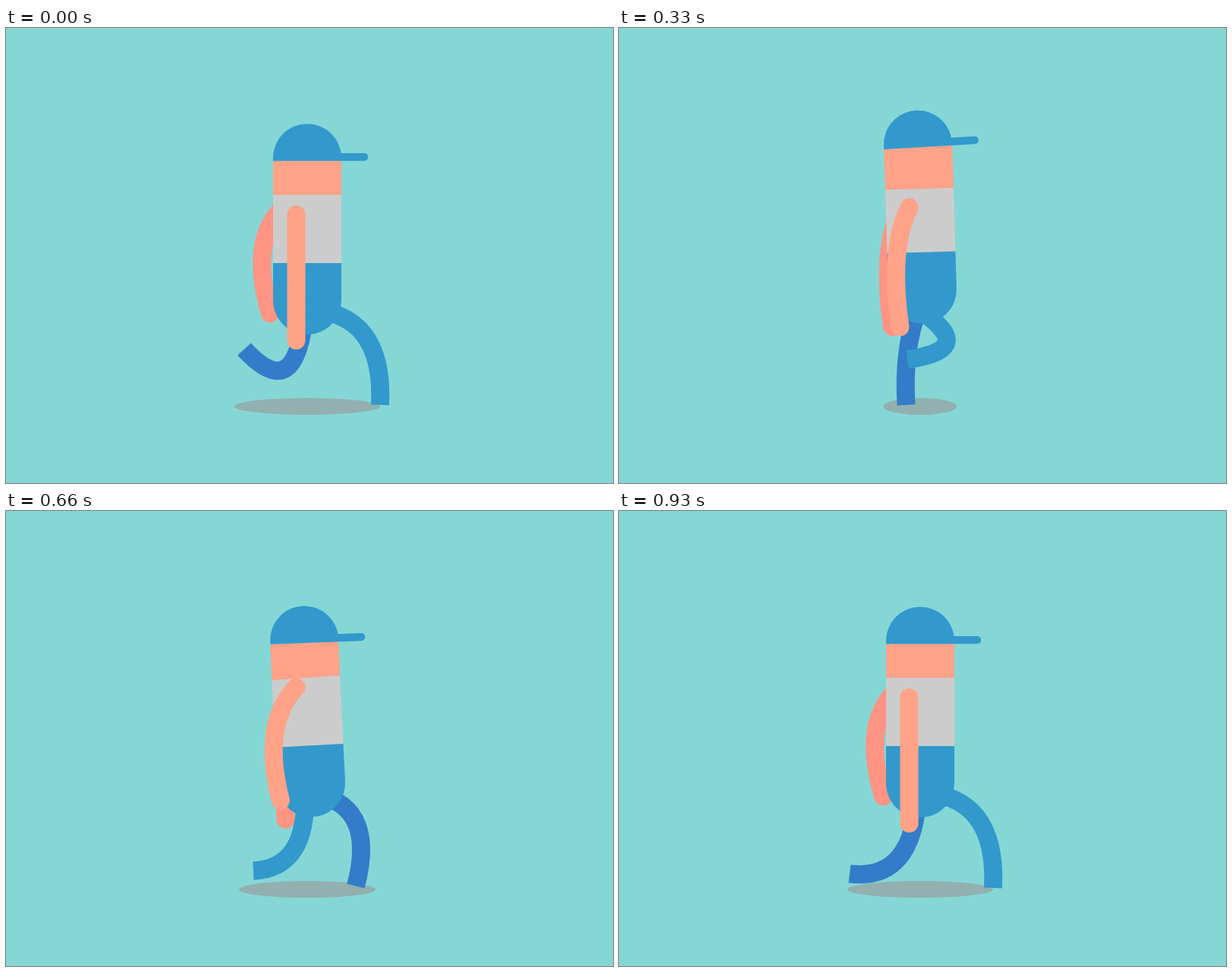
Recreate the animation shown at these times as an HTML page with a canvas. Size 800x600 px, loop 960 ms.

```html
<!DOCTYPE html>
<html lang="en">
<head>
<meta charset="utf-8">
<title>Walk cycle</title>
<style>
  html, body { margin: 0; width: 100%; height: 100%; overflow: hidden; background: #85d7d6; }
  canvas { display: block; }
</style>
</head>
<body>
<canvas id="stage" width="800" height="600"></canvas>
<script>
const ctx = document.getElementById('stage').getContext('2d');
const STEP = 30, CYCLE = 16;
const BG = '#85d7d6', SHADOW = '#91b0af', BLUE = '#3398cc', NAVY = '#327cc9',
      SKIN = '#ffa287', SKIN_BACK = '#ff9484', SHIRT = '#cccccc';

// Gait of one leg: step, knee handle, foot. The far leg runs half a cycle later.
const HIP = [394, 371];
const PLANT = [499, 373, 493, 497];
const GAIT = [
  [0, ...PLANT],
  [1, 417, 440, 409, 496.5],
  [3, 374, 425, 378.5, 497],
  [6, 398, 471, 326, 474.5],
  [7, 389, 489, 304, 478.3],
  [8, 384, 500, 314, 423.5],
  [9, 404, 471, 326.5, 435.5],
  [11, 476, 424, 380, 437],
  [14, 491, 381, 461, 494.5],
  [15, ...PLANT]
];

// Rises from 0 at a to 1 at peak, then falls to 0 at b
function tent(s, a, peak, b, fall = 1) {
  if (s <= a || s >= b) return 0;
  return s < peak ? (s - a) / (peak - a) : ((b - s) / (b - peak)) ** fall;
}

function leg(step) {
  const i = GAIT.findLastIndex(k => k[0] <= step);
  const a = GAIT[i], b = GAIT[i + 1] || a;
  const p = (step - a[0]) / (b[0] - a[0] || 1);
  return [...HIP, ...a.slice(1).map((v, n) => v + (b[n + 1] - v) * p)];
}

// Shoulder, bend and hand; swing runs from hanging (0) to fully back (1)
const arm = (x, swing, lift) => [
  x, 246 - 15.5 * swing - 2 * lift,
  x - 54 * swing, 329 - 55 * swing - 10 * lift,
  x - 24 * swing, 412 - 35.5 * swing
];

function limb(color, cap, [x, y, ...curve]) {
  ctx.beginPath();
  ctx.moveTo(x, y);
  ctx.quadraticCurveTo(...curve);
  ctx.lineWidth = 24;
  ctx.lineCap = cap;
  ctx.strokeStyle = color;
  ctx.stroke();
}

const rad = deg => deg * Math.PI / 180;

function edge([x, y, deg], shift = 0) {
  const c = Math.cos(rad(deg)), s = Math.sin(rad(deg));
  const mx = x - s * shift, my = y + c * shift;
  return [[mx - 45 * c, my - 45 * s], [mx + 45 * c, my + 45 * s]];
}

// The lower edge reaches one pixel under the next part to hide the seam
function band(color, top, bottom) {
  const [a, b] = edge(top), [c, d] = edge(bottom, 1);
  ctx.fillStyle = color;
  ctx.beginPath();
  [a, b, d, c].forEach(p => ctx.lineTo(...p));
  ctx.fill();
}

function part([x, y, deg], outline) {
  ctx.save();
  ctx.translate(x, y);
  ctx.rotate(rad(deg));
  ctx.fillStyle = BLUE;
  ctx.beginPath();
  outline();
  ctx.fill();
  ctx.restore();
}

function pantsOutline() {
  ctx.moveTo(-45, 0);
  ctx.lineTo(45, 0);
  ctx.arc(0, 49, 45, 0, Math.PI);
}

function capOutline() {
  ctx.moveTo(-45, 0);
  ctx.arc(0, -3.8, 45, Math.PI, 0);
  ctx.lineTo(45, 0);
  ctx.closePath();
  ctx.roundRect(30, -10.2, 50.2, 10.2, [0, 5, 5, 0]);
}

function draw(s) {
  const lift = tent(s, 0, 3, 7, 1.5) + tent(s, 7, 11, 15, 1.5);
  const swing = tent(s, 0, 7, 15);
  const lean = tent(s, 3, 7, 14);
  const nod = tent(s, 0, 3, 7);
  const look = tent(s, 3, 8.5, 14.5);
  const sag = 1.5 * lean;

  // Centre and angle of the lines where the parts meet
  const cap = [397 - 3.7 * nod - 5 * look, 175.2 - 18.4 * lift + sag, 4 * nod - 5.8 * look];
  const neck = [397 - 2.5 * lean, 220 - 8.5 * lift + sag, -4.45 * nod - 3.95 * lean];
  const belt = [397 + 3.4 * lean, 310.1 - 15 * lift + sag, -3.95 * lean];

  ctx.fillStyle = BG;
  ctx.fillRect(0, 0, 800, 600);
  ctx.fillStyle = SHADOW;
  ctx.beginPath();
  ctx.ellipse(397, 499, 96 - 47.5 * lift, 11, 0, 0, 2 * Math.PI);
  ctx.fill();

  limb(NAVY, 'butt', leg((s + CYCLE / 2) % CYCLE));
  limb(SKIN_BACK, 'round', arm(372, 1 - swing, lift));
  band(SKIN, cap, neck);
  band(SHIRT, neck, belt);
  part(belt, pantsOutline);
  part(cap, capOutline);
  limb(BLUE, 'butt', leg(s));
  limb(SKIN, 'round', arm(382.5, swing, lift));
}

const start = performance.now();
function tick() {
  const elapsed = Math.max(0, performance.now() - start);
  draw(Math.floor(elapsed / STEP) % CYCLE);
  requestAnimationFrame(tick);
}
tick();
</script>
</body>
</html>
```
